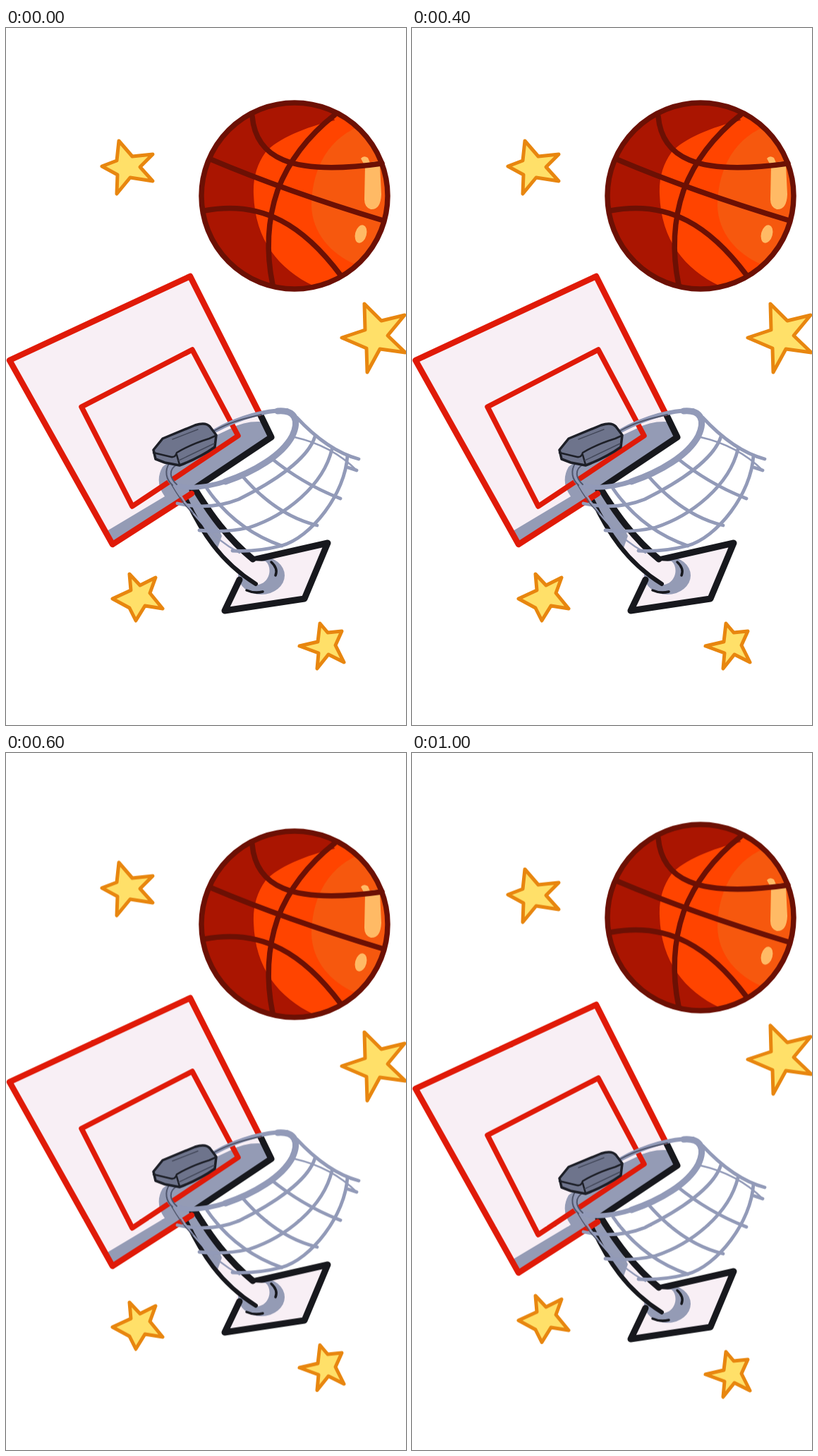
An HTML page for the animation above (1.2 s loop, 567x988 px).

```html
<!DOCTYPE html>
<html lang="en">
<head>
<meta charset="utf-8">
<title>Basketball</title>
<style>
  html, body { margin: 0; width: 100%; height: 100%; overflow: hidden; background: #fff; }
  svg { display: block; width: 100%; height: 100%; }
  path, circle, ellipse { stroke-linecap: round; stroke-linejoin: round; }
  .line { fill: none; }
  .bob { animation: bob 1.2s step-end infinite; }
  .ball-set { --d: -4.7px; }
  .hoop-set { --d: 4.7px; }
  @keyframes bob {
    0%, 33.3333%, 66.6667% { transform: translateY(0); }
    16.6667%, 83.3333% { transform: translateY(var(--d)); }
    50% { transform: translateY(calc(-1 * var(--d))); }
  }
  .star { fill: #ffe069; stroke: #e8860f; stroke-width: 5; }
  .seam { fill: none; stroke: #6c1004; stroke-width: 7.5; }
  .red { stroke: #e01a08; stroke-width: 8.5; }
  .ink { stroke: #17181d; stroke-width: 9; }
  .pale { fill: #f8eff5; }
  .shade { fill: #949bb5; }
  .net { fill: none; stroke: #929ab8; stroke-width: 4.8; }
  .thin { fill: none; stroke: #50566c; stroke-width: 2; }
</style>
</head>
<body>
<svg viewBox="0 0 567 988" preserveAspectRatio="none">
  <defs>
    <clipPath id="disc"><circle cx="409" cy="238" r="132"/></clipPath>
    <clipPath id="panel"><path d="M5 471 261 352 376 580 151 732Z"/></clipPath>
    <clipPath id="plate"><path d="M332 760 456 729 423 809 309 827Z"/></clipPath>
  </defs>

  <g class="bob hoop-set">
    <path class="star" d="M160 160 179 182 208 179 190 197 208 217 176 212 157 235 158 208 136 196 157 188Z"/>
    <path class="star" d="M445 844 456 857 476 855 467 875 479 899 457 888 441 908 443 886 416 876 442 870Z"/>

    <!-- base -->
    <path class="pale" d="M332 760 456 729 423 809 309 827Z"/>
    <ellipse class="shade" cx="362" cy="776" rx="33" ry="27" clip-path="url(#plate)"/>
    <path class="line ink" d="M350 754 456 730 423 809 310 826 331 782"/>

    <!-- pole -->
    <path class="pale" d="M252 660C275 708 303 756 355 789C373 789 379 765 368 756L349 755C315 723 290 688 270 654Z"/>
    <path class="shade" d="M252 660C264 690 280 718 300 737L306 720C295 698 284 676 270 654Z"/>
    <path class="line ink" d="M267 652C290 690 315 724 350 753"/>
    <path class="line ink" style="stroke-width:6" d="M255 667C277 714 303 756 354 788"/>
    <path class="line ink" style="stroke-width:3.5" d="M376 757Q386 766 382 776M341 797Q352 802 364 799"/>

    <!-- backboard -->
    <path class="pale" d="M5 471 261 352 376 580 151 732Z"/>
    <path class="shade" clip-path="url(#panel)" d="M138 716 225 664Q210 643 222 622L250 600 318 568Q342 555 370 559L390 590 150 750Z"/>
    <path class="line ink" d="M361 549 376 580 264 655"/>
    <path class="line red" d="M359 546 261 352 5 471 151 732 263 660"/>
    <path class="line red" style="stroke-width:7.5" d="M107 537 264 456 329 578 179 678Z"/>

    <!-- net -->
    <path class="net" d="M412 552C438 580 466 602 500 611"/>
    <path class="net" style="stroke-width:2.5" d="M409 580Q462 592 497 627"/>
    <path class="net" d="M375 609Q420 646 474 667"/>
    <path class="net" d="M334 634Q383 691 441 705"/>
    <path class="net" d="M285 653Q325 711 391 734"/>
    <path class="net" style="stroke-width:2.5" d="M238 646C258 684 290 722 331 744"/>
    <path class="net" d="M438 579C428 611 380 643 330 668Q290 684 243 674"/>
    <path class="net" d="M462 597C450 648 397 691 345 708Q310 716 274 712"/>
    <path class="net" d="M484 606C481 660 433 722 390 734Q355 743 321 741"/>
    <path class="net" d="M485 623 497 627"/>

    <!-- rim -->
    <path class="net" style="stroke-width:6" d="M296 571C330 552 370 541 398 542"/>
    <path class="thin" d="M295 571C318 558 340 553 362 548"/>
    <path class="net" style="stroke-width:9" d="M385 543C410 541 416 556 406 578C391 606 352 629 311 643"/>
    <path class="net" style="stroke-width:7" d="M330 636C290 652 250 657 234 643C226 634 230 623 239 616"/>
    <path class="thin" d="M242 619C230 626 232 638 242 647M232 616C224 628 227 640 236 648"/>
    <path class="thin" style="stroke-width:1.5" d="M235 648Q250 674 265 688"/>

    <!-- bracket -->
    <path fill="#6e748c" stroke="#1d1f27" stroke-width="3.5" d="M209 598 222 582 268 563Q283 558 289 565L298 577 296 594Q275 609 246 620L225 616 212 611Z"/>
    <path class="line" stroke="#1d1f27" stroke-width="2.5" d="M209 602 234 608Q240 609 242 602Q262 590 288 582L297 578M242 605 246 619"/>
    <path class="line" stroke="#43485a" stroke-width="1.5" d="M245 613 295 589M236 583 272 569"/>
  </g>

  <g class="bob ball-set">
    <path class="star" d="M508 391 532 415 565 407 541 436 566 460 530 455 512 488 511 454 476 439 509 428Z"/>
    <path class="star" d="M175 774 190 790 212 779 204 801 222 823 197 819 184 840 175 822 151 809 177 797Z"/>

    <g clip-path="url(#disc)">
      <circle cx="409" cy="238" r="134" fill="#ff4400"/>
      <path fill="#f6580e" d="M500 140C450 160 433 210 433 252C434 290 460 320 495 335L560 300 560 150Z"/>
      <path fill="#aa1501" d="M466 131C425 140 385 157 368 176C355 194 350 214 351 236C353 300 386 342 437 366L400 390 260 380 260 90 450 90Z"/>
      <path fill="#ffba65" d="M503 185Q507 180 513 184L516 191Q526 186 530 195L532 236Q531 258 517 257Q508 254 508 243L509 196Z"/>
      <ellipse cx="503" cy="292" rx="8" ry="13" fill="#ffba65" transform="rotate(15 503 292)"/>
    </g>
    <path class="seam" d="M349 125C354 182 400 211 533 192"/>
    <path class="seam" d="M466 123C418 161 396 201 385 230C371 271 368 315 378 364"/>
    <path class="seam" d="M290 186Q396 231 535 273"/>
    <path class="seam" d="M281 259C365 243 423 282 474 350"/>
    <circle class="seam" cx="409" cy="238" r="132"/>
  </g>
</svg>
</body>
</html>
```
